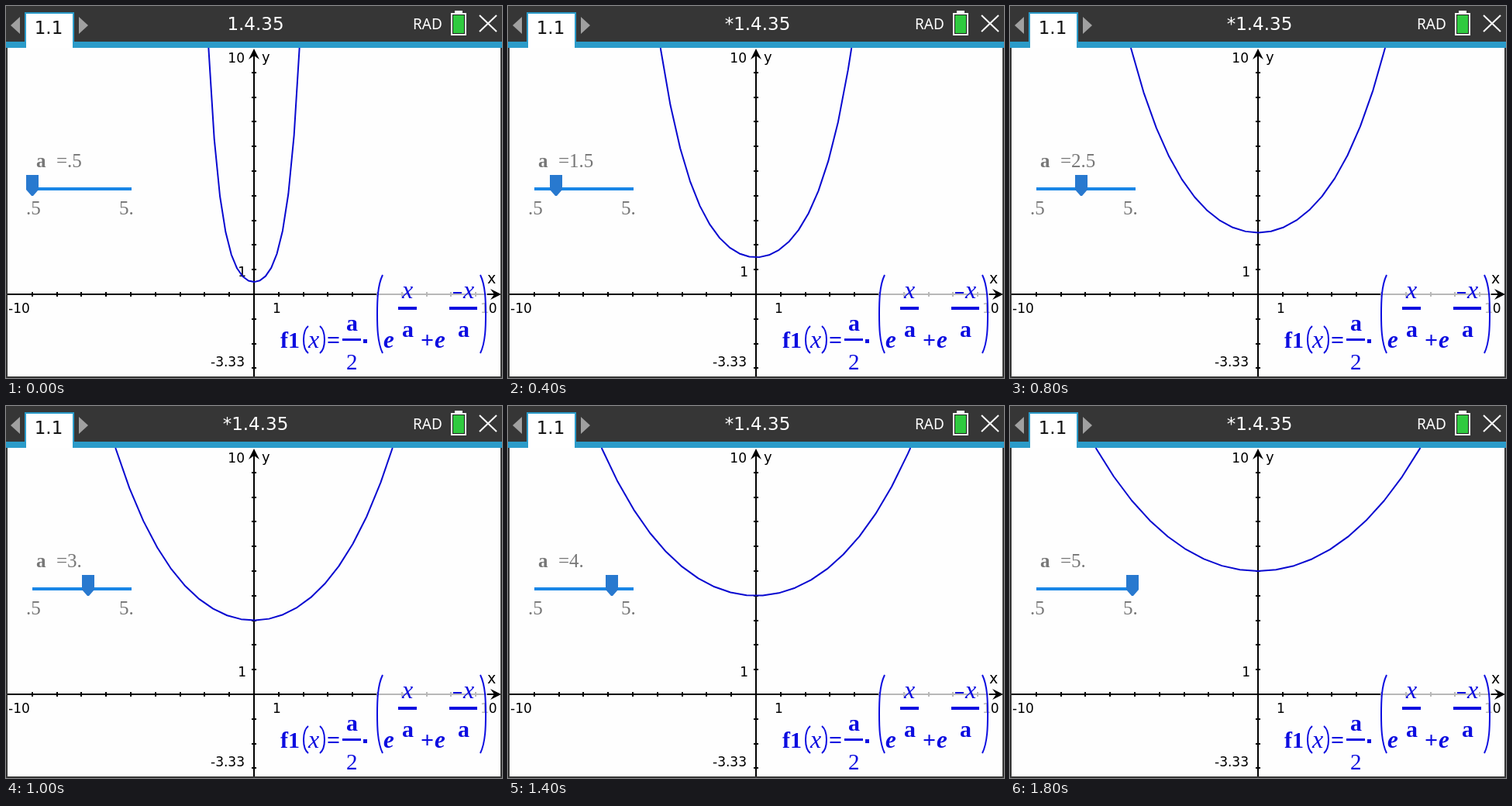
Animation of 640x480 px, one loop 2000 ms. Source, as an HTML page with a canvas:

```html
<!DOCTYPE html>
<html lang="en">
<head>
<meta charset="utf-8">
<title>Catenary slider</title>
<style>
html, body { margin: 0; width: 100%; height: 100%; overflow: hidden; background: #fff; }
canvas { display: block; }
</style>
</head>
<body>
<canvas id="stage" width="640" height="480"></canvas>
<script>
const ctx = document.getElementById('stage').getContext('2d');
const STEP_MS = 200, STEPS = 10;
const UNIT = 31.8, OX = 320, OY = 372, TOP = 54;
const DARK = '#363636', BAR = '#2b9bc9', INK = '#0d0de0', GREY = '#777';
const SANS = '"DejaVu Sans", sans-serif', SERIF = '"Liberation Serif", serif';

function rect(x, y, w, h, color) {
  ctx.fillStyle = color;
  ctx.fillRect(x, y, w, h);
}

function trace(points) {
  ctx.beginPath();
  points.forEach(([x, y]) => ctx.lineTo(x, y));
}

function polygon(points, color) {
  trace(points);
  ctx.fillStyle = color;
  ctx.fill();
}

function line(points, color, width) {
  trace(points);
  ctx.strokeStyle = color;
  ctx.lineWidth = width;
  ctx.stroke();
}

function text(str, x, y, font, color, align = 'left') {
  ctx.font = font;
  ctx.fillStyle = color;
  ctx.textAlign = align;
  ctx.fillText(str, x, y);
}

function drawHeader(title) {
  rect(0, 0, 640, 46, DARK);
  rect(0, 46, 640, 8, BAR);
  rect(24, 8, 64, 46, BAR);
  rect(26, 10, 60, 44, '#fff');
  polygon([[6, 25], [18, 14], [18, 36]], '#a0a0a0');
  polygon([[106, 25], [94, 14], [94, 36]], '#a0a0a0');
  text('1.1', 55, 36, `23px ${SANS}`, '#111', 'center');
  text(title, 322, 31, `23px ${SANS}`, '#fff', 'center');
  text('RAD', 525, 30, '19px "Noto Sans", sans-serif', '#fff');
  rect(579, 6, 10, 4, '#fff');
  rect(574, 9, 20, 29, '#fff');
  rect(576, 11, 16, 25, '#222');
  rect(577, 12, 14, 23, '#2fca3f');
  line([[611, 12], [633, 33]], '#fff', 2);
  line([[633, 12], [611, 33]], '#fff', 2);
}

function drawAxes() {
  rect(2, 371, 634, 2, '#000');
  rect(319, 58, 2, 420, '#000');
  for (let n = -9; n <= 9; n++) {
    if (n) rect(Math.round(OX + n * UNIT) - 1, 369, 2, 6, '#000');
    if (n && n >= -3) rect(317, Math.round(OY - n * UNIT) - 1, 6, 2, '#000');
  }
  polygon([[320, 55], [327, 69], [320, 64], [313, 69]], '#000');
  const font = `17px ${SANS}`;
  text('10', 308, 73, font, '#000', 'right');
  text('1', 310, 349, font, '#000', 'right');
  text('-3.33', 308, 465, font, '#000', 'right');
  text('-10', 3, 396, font, '#000');
  text('1', 344, 396, font, '#000');
  text('10', 612, 396, font, '#000');
  text('y', 330, 72, `18px ${SANS}`, '#000');
  text('x', 621, 358, `19px ${SANS}`, '#000');
  rect(478, 363, 143, 112, 'rgba(255,255,255,.72)');
  polygon([[639, 372], [625, 379], [630, 372], [625, 365]], '#000');
}

// The curve is sampled coarsely, so its chords show slightly.
function drawCatenary(a) {
  const reach = a * Math.acosh(10 / a) * UNIT;
  const stride = 10.4 * Math.sqrt(a);
  const point = dx => [OX + dx, OY - a * Math.cosh(dx / UNIT / a) * UNIT];
  const points = [];
  for (let dx = -reach; dx < reach; dx += stride) points.push(point(dx));
  points.push(point(reach));
  ctx.lineJoin = 'round';
  line(points, '#0808d0', 2);
}

function drawSlider(a) {
  const value = a < 1 ? '.5' : a % 1 ? String(a) : a + '.';
  const x = Math.min(158, 2 * Math.round((34 + 28.6 * (a - .5)) / 2));
  text('a', 39, 208, `bold 25px ${SERIF}`, GREY);
  text('=' + value, 65, 208, `25px ${SERIF}`, GREY);
  text('.5', 26, 269, `25px ${SERIF}`, GREY);
  text('5.', 146, 269, `25px ${SERIF}`, GREY);
  rect(34, 234, 128, 4, '#1986e6');
  polygon([[x - 8, 218], [x + 8, 218], [x + 8, 237], [x + 1, 245], [x - 1, 245], [x - 8, 237]], '#2879cf');
}

function paren(x, top, bottom, bulge, width) {
  const mid = (top + bottom) / 2, bend = (bottom - top) * .28;
  ctx.beginPath();
  ctx.moveTo(x, top);
  ctx.bezierCurveTo(x - bulge, top + bend * .5, x - bulge, mid - bend * .5, x - bulge, mid);
  ctx.bezierCurveTo(x - bulge, mid + bend * .5, x - bulge, bottom - bend * .5, x, bottom);
  ctx.strokeStyle = INK;
  ctx.lineWidth = width;
  ctx.stroke();
}

function drawFormula() {
  const put = (str, x, y, style) => text(str, x, y, `${style} ${SERIF}`, INK);
  const bold = 'bold 30px', italic = 'italic 32px', boldItalic = 'italic bold 31px';
  put('f1', 354, 441, bold);
  paren(390, 413, 448, 6, 2);
  put('x', 390, 441, italic);
  paren(405, 413, 448, -6, 2);
  put('=', 414, 441, bold);
  put('a', 439, 419, bold);
  rect(434, 429, 24, 3, INK);
  put('2', 439, 469, '29px');
  rect(461, 430, 5, 5, INK);
  paren(486, 347, 448, 7, 2);
  put('e', 487, 441, boldItalic);
  put('x', 511, 377, italic);
  rect(506, 388, 24, 4, INK);
  put('a', 511, 427, bold);
  put('+', 535, 441, bold);
  put('e', 553, 441, boldItalic);
  rect(577, 369, 11, 2, INK);
  put('x', 590, 377, italic);
  rect(572, 388, 36, 4, INK);
  put('a', 583, 427, bold);
  paren(612, 347, 448, -7, 2);
}

function draw(now) {
  const step = Math.floor(now / STEP_MS) % STEPS;
  const a = (step + 1) / 2;
  rect(0, 0, 640, 480, DARK);
  rect(2, TOP, 636, 424, '#fefefe');
  drawAxes();
  drawCatenary(a);
  drawSlider(a);
  drawFormula();
  drawHeader(step ? '*1.4.35' : '1.4.35');
}

const start = performance.now();
function tick() {
  draw(performance.now() - start);
  requestAnimationFrame(tick);
}
tick();
</script>
</body>
</html>
```
